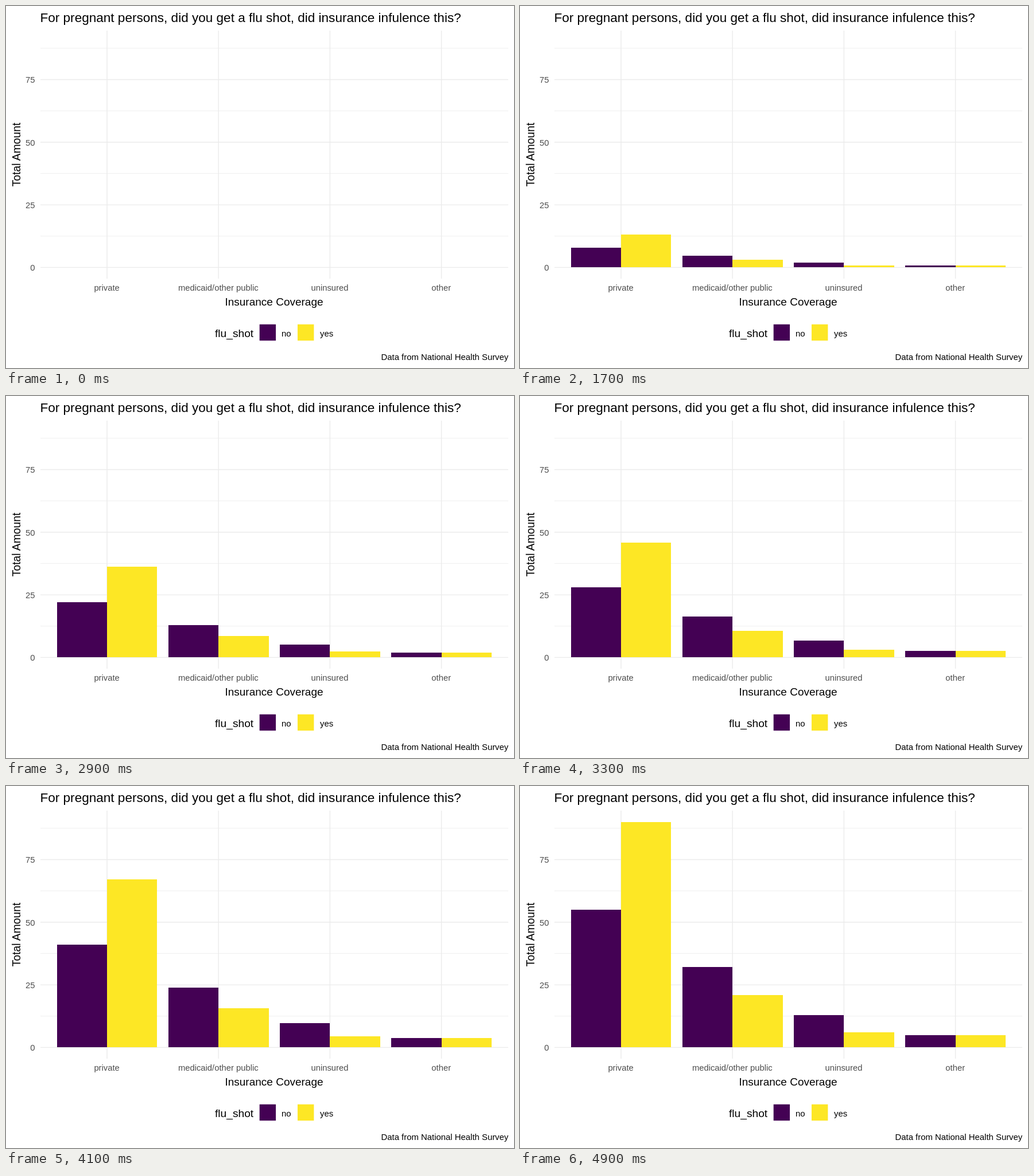
An HTML page that plays this animation: 885 px wide and 632 px high, repeating every 10000 ms.

```html
<!DOCTYPE html>
<html lang="en">
<head>
<meta charset="utf-8">
<title>Flu shots by insurance coverage</title>
<style>
  html, body { margin: 0; width: 100%; height: 100%; overflow: hidden; background: #fff; }
  svg { display: block; width: 885px; height: 632px; font-family: "Liberation Sans", Arial, sans-serif; }
</style>
</head>
<body>
<svg id="chart" viewBox="0 0 885 632"></svg>
<script>
const NS = "http://www.w3.org/2000/svg";
const chart = document.getElementById("chart");
const LOOP = 10000, STEP = 100, LAST = 49;
const BASE = 456.4, FLOOR = Math.round(BASE), UNIT = 4.373;
const LEFT = 60, RIGHT = 875, TOP = 43, BOTTOM = 476;
const FILL = { no: "#440154", yes: "#fde725" };
const GRID = "#ebebeb", GREY = "#4d4d4d";
const groups = [
  { name: "private", no: 55, yes: 90 },
  { name: "medicaid/other public", no: 32, yes: 21 },
  { name: "uninsured", no: 13, yes: 6 },
  { name: "other", no: 5, yes: 5 }
];

function add(tag, attrs, text) {
  const el = document.createElementNS(NS, tag);
  for (const key in attrs) el.setAttribute(key, attrs[key]);
  if (text) el.textContent = text;
  return chart.appendChild(el);
}

const label = (text, x, y, size, anchor = "start", fill = "#000", extra = {}) =>
  add("text", { x, y, "font-size": size, "text-anchor": anchor, fill, ...extra }, text);

const line = (x1, y1, x2, y2, width) =>
  add("line", { x1, y1, x2, y2, stroke: GRID, "stroke-width": width });

const yOf = value => BASE - value * UNIT;
const xOf = i => 176 + 194.2 * i;

// Grid and axes
for (let v = 12.5; v < 90; v += 25) line(LEFT, yOf(v), RIGHT, yOf(v), 0.8);
for (let v = 0; v < 90; v += 25) {
  line(LEFT, yOf(v), RIGHT, yOf(v), 1.4);
  label(String(v), 50.5, yOf(v) + 6, 14.8, "end", GREY);
}
groups.forEach((g, i) => {
  line(xOf(i), TOP, xOf(i), BOTTOM, 1.4);
  label(g.name, xOf(i) - 0.4, 497, 14.8, "middle", GREY);
});

// Bars, with edges on whole pixels
const bars = [];
groups.forEach((g, i) => {
  const [left, mid, right] = [-87.4, 0, 87.4].map(dx => Math.round(xOf(i) + dx));
  const bar = (kind, x, end) =>
    bars.push({ value: g[kind], el: add("rect", { x, width: end - x, fill: FILL[kind] }) });
  bar("no", left, mid);
  bar("yes", mid, right);
});

// Titles, legend and caption
label("For pregnant persons, did you get a flu shot, did insurance infulence this?", 59.5, 28, 22.55);
label("Insurance Coverage", 467, 523, 19, "middle");
label("Total Amount", 0, 0, 19.3, "middle", "#000", { transform: "translate(24.7 259.5) rotate(-90)" });
label("flu_shot", 364, 578, 19.2);
[["no", 441.7, 480], ["yes", 508, 547]].forEach(([kind, x, tx]) => {
  add("rect", { x, y: 555.8, width: 28.4, height: 28.4, fill: FILL[kind] });
  label(kind, tx, 577, 14.9);
});
label("Data from National Health Survey", 875.3, 618, 14.9, "end");

// Sine ease-in, in discrete steps, then hold
function draw(time) {
  const step = Math.min(Math.floor((time % LOOP) / STEP), LAST);
  const grow = 1 - Math.cos(step / LAST * Math.PI / 2);
  for (const { value, el } of bars) {
    const y = yOf(value * grow);
    const height = FLOOR - Math.round(y) || BASE - y; // slivers keep their true height
    el.setAttribute("y", FLOOR - height);
    el.setAttribute("height", height);
  }
}

const start = performance.now();
function tick() {
  draw(performance.now() - start);
  requestAnimationFrame(tick);
}
draw(0);
requestAnimationFrame(tick);
</script>
</body>
</html>
```
